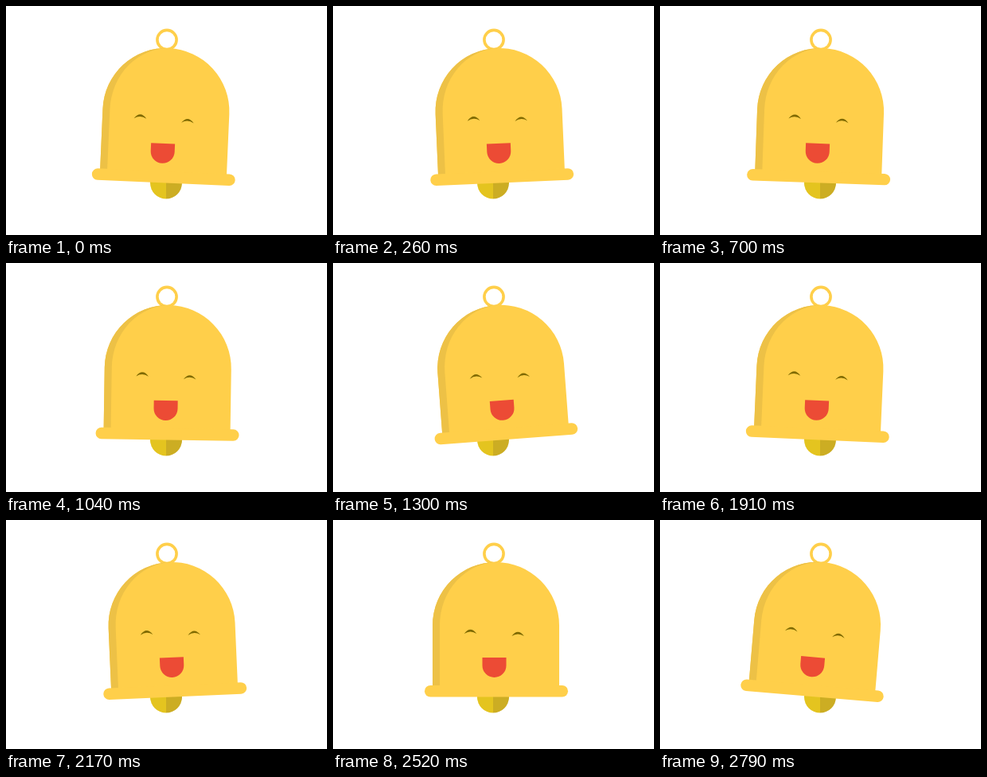
Animation, 403 px wide and 288 px high, one loop 2850 ms. Source, as an HTML page:

```html
<!DOCTYPE html>
<html lang="en">
<head>
<meta charset="utf-8">
<title>Swinging bell</title>
<style>
  html, body { margin: 0; width: 100%; height: 100%; overflow: hidden; background: #fff; }
  svg { display: block; width: 100vw; height: 100vh; }
</style>
</head>
<body>
<svg viewBox="0 0 403 288">
  <circle cx="202" cy="42.5" r="12.1" fill="#fff" stroke="#ffcf4a" stroke-width="3.6"/>
  <g id="clapper">
    <path d="M201 202.5A20 20 0 0 0 201 242.5Z" fill="#e4c41f"/>
    <path d="M201 202.5A20 20 0 0 1 201 242.5Z" fill="#ccad23"/>
  </g>
  <g id="bell">
    <path d="M125 215V132.5A79.5 79.5 0 0 1 284 132.5V215Z" fill="#ffcf4a"/>
    <path d="M207 53H204.5A79.5 79.5 0 0 0 125 132.5V210H134V132.5A73 79.5 0 0 1 207 53Z" fill="#edc146"/>
    <rect x="115" y="208" width="180" height="14.5" rx="7.25" fill="#ffcf4a"/>
    <g fill="#7f6a00">
      <path id="eye" d="M164.7 143Q172.5 132.6 180.3 143Q172.5 137.8 164.7 143Z"/>
      <use href="#eye" x="59.6" y="3"/>
    </g>
    <path d="M187.5 173H217.5V183A15 15 0 0 1 187.5 183Z" fill="#ec4b35"/>
  </g>
</svg>
<script>
  const LOOP = 2850;
  const PIVOT = "204.5 50";
  // One swing in eleven held poses, in degrees; three swings per loop.
  const SWING = [2.5, 0.85, -0.8, -2.5, -4.3, -4, -2.2, 0, 2.05, 3.8, 4.85];
  const bell = document.getElementById("bell");

  // Poses change three times every 260 ms, on 10 ms ticks.
  function draw(ms) {
    const tick = Math.floor((ms % LOOP) / 10);
    const step = Math.floor(tick * 3 / 26);
    bell.setAttribute("transform", `rotate(${SWING[step % SWING.length]} ${PIVOT})`);
  }

  const start = performance.now();
  function loop(now) {
    draw(Math.max(0, now - start));
    requestAnimationFrame(loop);
  }
  draw(0);
  requestAnimationFrame(loop);
</script>
</body>
</html>
```
